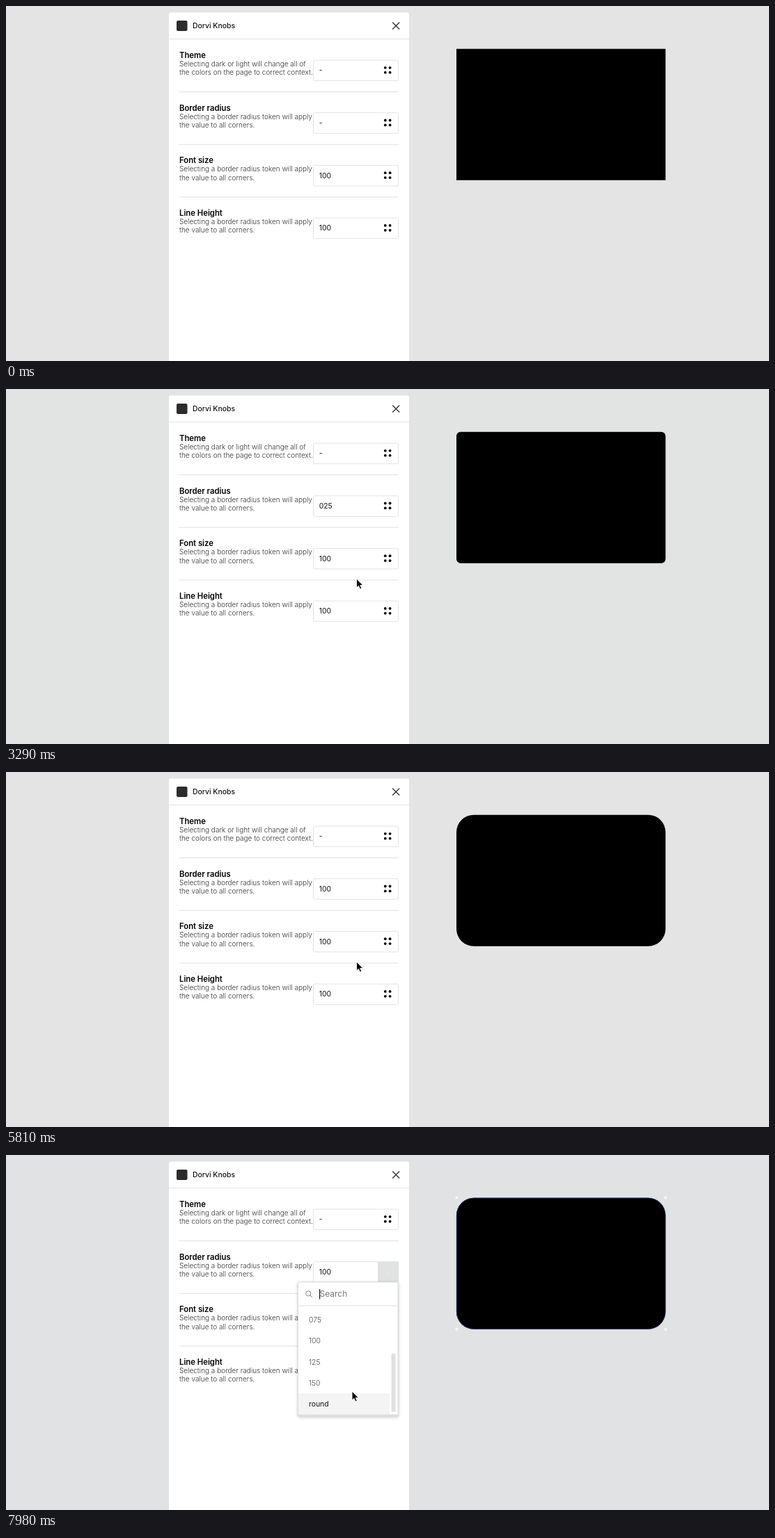
Write an HTML page that moves like this. It is 1096x511 px and loops after 8000 ms.

```html
<!DOCTYPE html>
<html lang="en">
<head>
<meta charset="utf-8">
<title>Token panel</title>
<style>
html, body { margin: 0; width: 100%; height: 100%; overflow: hidden; background: #e4e4e4; }
svg { display: block; }
text { font: 400 10.4px Inter, "Liberation Sans", sans-serif; fill: #111; }
.name { font-weight: 500; }
.head { font-weight: 600; font-size: 11.3px; fill: #000; }
.body { font-weight: 300; font-size: 10px; fill: #333; }
.item { font-weight: 300; fill: #444; }
.search { font-size: 12px; fill: #777; }
.menu { filter: drop-shadow(0 1px 2px rgba(0, 0, 0, .22)); }
</style>
</head>
<body>
<svg id="stage" width="1096" height="511" viewBox="0 0 1096 511"></svg>
<script>
const LOOP = 8000, STEP = 70, ROW = 75.7, ITEM = 30.25;
const TOKENS = ['012', '025', '050', '075', '100', '125', '150', 'round'];
const APPLY = ['Selecting a border radius token will apply', 'the value to all corners.'];
const THEME = ['Selecting dark or light will change all of', 'the colors on the page to correct context.'];

// Cursor tip: time, x, y
const PATH = [
  [350, 608, 362], [490, 712, 167], [630, 712, 167], [1120, 677, 67], [1610, 677, 67],
  [2030, 546, 167], [2380, 546, 167], [2590, 503.5, 273], [3430, 503.5, 273],
  [3780, 546, 167], [4060, 546, 167], [4230, 503.5, 273], [5950, 503.5, 273],
  [6510, 546, 167], [6790, 546, 167], [7140, 497, 340]
];
const CLICKS = [1330, 2100, 3080, 3850, 5530, 6650];
const MENUS = [[2240, 3150], [3990, 5600], [6720, LOOP]];
const SELECTED = [[1400, 3150], [4340, 5600], [7280, LOOP]];
const SCROLLS = [[4620, 5220, 5600], [7560, 7980, LOOP]];

const within = (t, spans) => spans.find(([a, b]) => t >= a && t < b);
const stage = document.getElementById('stage');

const rect = (x, y, w, h, fill, extra = '') =>
  `<rect x="${x}" y="${y}" width="${w}" height="${h}" fill="${fill}" ${extra}/>`;
const line = (d, color, width = 1) =>
  `<path d="${d}" fill="none" stroke="${color}" stroke-width="${width}"/>`;
const text = (x, y, cls, s) => `<text x="${x}" y="${y}" class="${cls}">${s}</text>`;
const circle = (x, y, r, color, width) =>
  `<circle cx="${x}" cy="${y}" r="${r}" fill="none" stroke="${color}" stroke-width="${width}"/>`;

function cursorAt(t) {
  if (t < PATH[0][0]) return null;
  const next = PATH.findIndex(p => p[0] > t);
  if (next < 0) return PATH[PATH.length - 1].slice(1);
  const [t0, x0, y0] = PATH[next - 1], [t1, x1, y1] = PATH[next];
  const k = (t - t0) / (t1 - t0);
  return [x0 + (x1 - x0) * k, y0 + (y1 - y0) * k];
}

function scrollAt(t) {
  const span = SCROLLS.find(([a, , end]) => t >= a && t < end);
  return span ? 94 * Math.min(1, (t - span[0]) / (span[1] - span[0])) : 0;
}

function row(i, head, body, value, open) {
  const y = i * ROW;
  let s = text(249, 75 + y, 'head', head) +
    body.map((b, n) => text(249, 87 + y + n * 12.3, 'body', b)).join('') +
    rect(441.5, 78 + y, 122, 29.6, '#fff', 'rx="2" stroke="#e3e3e3"') +
    text(449.7, 96.3 + y, '', value);
  if (open) {
    s += rect(534, 77.5 + y, 30, 30, '#e1e3e3') + rect(549, 94 + y, 2, 1, '#f4f4f4');
  } else {
    for (const dx of [544.8, 551.6]) for (const dy of [88.8, 95.7])
      s += `<circle cx="${dx}" cy="${dy + y}" r="1.9"/>`;
  }
  if (i < 3) s += line(`M249 ${123.6 + y}H564`, '#e0e0e0');
  return s;
}

function panel(value, open) {
  return rect(234, 9.5, 345, 520, '#fff', 'rx="2"') +
    rect(245, 21, 15.5, 15, '#2c2c2c', 'rx="2"') +
    text(268, 32, 'name', 'Dorvi Knobs') +
    line('M555.2 23.5l10 10m0-10l-10 10', '#222', 1.1) +
    line('M234 47.5H579', '#e3e3e3') +
    row(0, 'Theme', THEME, '-') +
    row(1, 'Border radius', APPLY, value, open) +
    row(2, 'Font size', APPLY, '100') +
    row(3, 'Line Height', APPLY, '100');
}

function menu(scroll, hotY, caret) {
  const over = Math.floor((hotY - 225 + scroll) / ITEM);
  const items = TOKENS.map((name, i) => {
    const y = 225.3 + i * ITEM - scroll, on = i === over && hotY > 225;
    return (on ? rect(420, y, 131, ITEM, '#f4f4f4') : '') +
      text(435, y + 19, on ? '' : 'item', name);
  }).join('');
  return rect(419, 182.5, 145, 194, '#dcdede', 'rx="2" class="menu"') +
    rect(420, 183.5, 142.5, 189.8, '#fff') +
    circle(434.3, 199.3, 3.6, '#777', .9) + line('M437 202l3 3', '#777', .9) +
    text(450.5, 204.4, 'search', 'Search') +
    (caret ? rect(450, 193, 1.2, 14.5, '#111') : '') +
    line('M420 217H562.5', '#e0e0e0') +
    `<g clip-path="url(#list)">${items}</g>` +
    rect(553.6, 228 + scroll * .614, 6, 84, '#e0e0e0', 'rx="1.5"');
}

function card(radius, hover, selected) {
  let s = rect(647, 61.7, 300.4, 189, '#000', `rx="${radius}"`);
  if (hover || selected)
    s += rect(647.3, 62, 299.8, 188.4, 'none', `rx="${radius}" stroke="${selected ? '#14386e' : '#3656c8'}" stroke-width=".8"`);
  if (selected)
    for (const x of [647.3, 947.4]) for (const y of [61.5, 250.8])
      s += rect(x - 1.7, y - 1.7, 3.4, 3.4, '#f5f9fc');
  return s;
}

const ring = (x, y) => circle(x, y, 19, '#000', 3) +
  circle(x, y, 20.8, '#fff', 1.2) + circle(x, y, 17, '#fff', 1.2);

const pointer = (x, y) => `<path transform="translate(${x} ${y})"
  d="M0 0V13L3 10.4 5 15 7.3 14 5.3 9.6H9.4Z" stroke="#fff" stroke-width="1"/>`;

function scene(t) {
  const tip = cursorAt(t), open = within(t, MENUS);
  const selected = within(t, SELECTED);
  const click = CLICKS.some(c => t >= c && t < c + 140);
  const [value, radius] = t < 3150 ? ['-', 0] : t < 5600 ? ['025', 6] : ['100', 25];
  const bg = t < 1330 ? '#e4e4e4' : t < 5600 ? '#e2e4e3' : t < 7280 ? '#e4e4e4' : '#e1e2e4';
  let s = '<clipPath id="list"><rect x="420" y="218" width="143" height="155.3"/></clipPath>' +
    rect(0, 0, 1096, 511, bg) + panel(value, open) +
    card(radius, t >= 700 && t < 1400, selected);
  if (open) s += menu(scrollAt(t), tip[1] + 4, (t - open[0]) % 1060 < 530);
  if (tip) s += (click ? ring(tip[0] + .7, tip[1] + 2) : '') + pointer(...tip);
  return s;
}

let shown = -1;
function tick() {
  const t = Math.floor(performance.now() % LOOP / STEP) * STEP;
  if (t !== shown) stage.innerHTML = scene(shown = t);
  requestAnimationFrame(tick);
}
tick();
</script>
</body>
</html>
```
